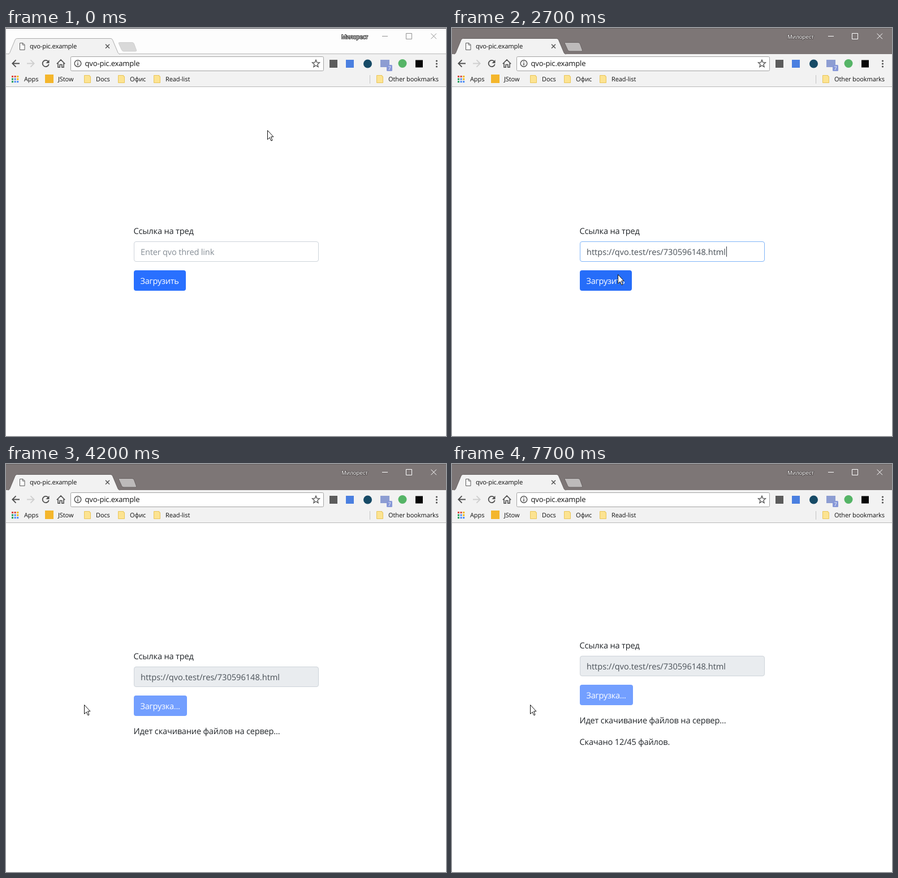
Animation of 778x719 px, one loop 8000 ms. Source, as an HTML page:

```html
<!DOCTYPE html>
<html lang="ru">
<head>
<meta charset="utf-8">
<title>Loader</title>
<style>
  html, body { margin: 0; width: 100%; height: 100%; overflow: hidden; background: #fff; }
  svg { display: block; }
  text {
    font-family: "Open Sans", "Noto Sans", sans-serif;
    text-rendering: geometricPrecision;
    fill: #111;
  }
  .ui { font-size: 11px; letter-spacing: -.1px; }
  .tab { font-size: 11.2px; letter-spacing: -.15px; }
  .url { font-size: 13px; letter-spacing: -.15px; }
  .user { font-size: 10px; letter-spacing: -.2px; fill: #fff; paint-order: stroke; stroke-width: 1.6px; stroke-linejoin: round; }
  .page text { font-size: 14.6px; letter-spacing: -.18px; fill: #212529; }
  .page .hint { fill: #868e96; }
  .page .value { fill: #495057; letter-spacing: 0; }
  .page .action { fill: #fff; letter-spacing: -.3px; }
  .line { fill: none; stroke: #505050; stroke-width: 1.8; }
</style>
</head>
<body>
<svg width="778" height="719" viewBox="0 0 778 719">
  <rect width="778" height="719" fill="#fff"/>

  <!-- title bar -->
  <rect id="bar" width="778" height="45"/>
  <rect id="topLine" width="778" height="1"/>
  <path id="newTab" d="M200.500 25.500H223q2.500 0 3.500 2.500l4 11q.8 2-1.500 2H208q-2.500 0-3.500-2.500l-5-11q-1-2 1-2Z"/>
  <text id="user" class="user" x="593" y="19">Милорест</text>
  <g id="controls" fill="none">
    <path d="M665 14.500H675M707.500 9.500h10v10h-10ZM751.500 9.700l9.500 9.500M761 9.700l-9.500 9.500"/>
  </g>

  <!-- toolbar -->
  <rect y="45" width="778" height="59" fill="#f2f2f2"/>
  <path id="seam" d="M0 45.500H5M201 45.500H778" stroke-width="1"/>
  <path id="tab" fill="#f2f2f2" d="M3.500 46q2.200 0 3.200-2.500L16 21q1-2.500 3.500-2.500H185q2.500 0 3.500 2.500l9.500 22.500q1 2.500 3.500 2.500"/>
  <path d="M0 103.500H778" stroke="#b9b9b9"/>
  <path d="M24.500 26.500h5.500l3 3v9h-8.500ZM29.500 26.500v3.500h3.500" fill="#fff" stroke="#5a5a5a"/>
  <text class="tab" x="42" y="36">qvo-pic.example</text>
  <path class="line" style="stroke-width:1.400" d="M176 28.800l7 7M183 28.800l-7 7"/>

  <path class="line" d="M24 62.500H11.500M17.500 56.300l-6.200 6.200 6.200 6.200"/>
  <path class="line" style="stroke:#cfcfcf" d="M37 62.500H49.500M43.500 56.300l6.200 6.200-6.200 6.200"/>
  <path class="line" d="M74.800 59.300A5.600 5.600 0 1 0 75.700 63.800"/>
  <path d="M76.500 56v6h-6Z" fill="#505050"/>
  <path class="line" style="stroke-width:1.600" d="M89.800 63.200L97 56l7.200 7.200M92 62v7.200h3.200v-4.700h3.600v4.700h3.200V62"/>

  <rect x="114.500" y="50.500" width="447" height="25" rx="2" fill="#fff" stroke="#a3a3a3"/>
  <circle cx="127" cy="62.500" r="5.800" class="line" style="stroke-width:1.400"/>
  <path d="M127 61.500v4.500M127 58.700v1.600" stroke="#505050" stroke-width="1.500"/>
  <text class="url" x="139.500" y="67">qvo-pic.example</text>
  <path id="star" class="line" style="stroke-width:1.300"/>

  <rect x="572" y="56" width="14" height="14" fill="#5c5c5c"/>
  <rect x="601" y="56" width="14" height="14" fill="#4a7fe0"/>
  <circle cx="639.500" cy="63" r="7.500" fill="#164a66"/>
  <rect x="662" y="56" width="16" height="13" fill="#8d9dd2"/>
  <rect x="673" y="65" width="10" height="11" rx="1.500" fill="#8798d8"/>
  <text x="675.500" y="74" style="font-size:9px;fill:#fff">7</text>
  <circle cx="701" cy="62.500" r="7.500" fill="#55b466"/>
  <rect x="724" y="56.500" width="13" height="13" fill="#080808"/>
  <g fill="#505050">
    <circle cx="761.500" cy="58" r="1.600"/><circle cx="761.500" cy="63" r="1.600"/><circle cx="761.500" cy="68" r="1.600"/>
  </g>

  <!-- bookmarks -->
  <g id="marks">
    <rect x="69" y="82" width="15" height="15" fill="#f4b62c"/>
    <path d="M643.500 83V98" stroke="#c4c4c4"/>
  </g>

  <!-- page -->
  <g id="page" class="page">
    <text x="225.500" y="363">Ссылка на тред</text>
    <rect id="field" x="226.500" y="376.500" width="326" height="35" rx="3.500"/>
    <text id="fieldText" x="238" y="400"></text>
    <path id="caret" stroke="#333a40"/>
    <rect id="ring" x="225" y="426" height="38" rx="5" fill="none" stroke="#a9c6ff" stroke-width="2"/>
    <rect id="button" x="226" y="427" height="36" rx="4"/>
    <text id="action" class="action" x="237.500" y="451"></text>
    <text id="status" x="225.500" y="495"></text>
    <text id="count" x="225.500" y="533"></text>
  </g>

  <g id="cursor">
    <path id="arrow" d="M.5 .5V16.500L4.200 13 6.600 18.500H8.600V17L6.600 11.800H11Z" fill="#fff" stroke="#111"/>
    <path id="beam" d="M-3 -6.500H-1L.5 -5.500 2 -6.500H4M.500 -5.500V6.500M-3 7.500H-1L.5 6.500 2 7.500H4" fill="none" stroke="#222" stroke-width="1.200"/>
  </g>
</svg>

<script>
const LOOP = 8000;
const LINK = 'https://qvo.test/res/730596148.html';
const $ = id => document.getElementById(id);
const set = (id, attrs) => {
  for (const k in attrs) $(id).setAttribute(k, attrs[k]);
};
const show = (id, on) => set(id, { visibility: on ? 'visible' : 'hidden' });
const write = (id, text) => {
  if ($(id).textContent !== text) $(id).textContent = text;
};
const add = (parent, tag, attrs, text = '') => {
  const el = document.createElementNS('http://www.w3.org/2000/svg', tag);
  for (const k in attrs) el.setAttribute(k, attrs[k]);
  el.textContent = text;
  $(parent).append(el);
};

function drawChrome() {
  const points = Array.from({ length: 10 }, (_, i) => {
    const r = i % 2 ? 3 : 6.8, a = i * Math.PI / 5;
    return (548 + r * Math.sin(a)).toFixed(2) + ' ' + (63 - r * Math.cos(a)).toFixed(2);
  });
  set('star', { d: 'M' + points.join('L') + 'Z' });

  const [red, yellow, green, blue] = ['#db4437', '#f0b400', '#0f9d58', '#4285f4'];
  [red, red, yellow, green, blue, yellow, green, blue, blue].forEach((fill, i) =>
    add('marks', 'rect', { x: 10 + i % 3 * 4.6, y: 84 + Math.floor(i / 3) * 4.6, width: 3, height: 3, fill }));

  for (const x of [138, 198, 261, 655])
    add('marks', 'path', {
      d: `M${x + .5} 83.500h9.500v2h1.500v11h-11Z`, fill: '#fce391', stroke: '#e9c65c'
    });

  const labels = [[32, 'Apps'], [92, 'JStow'], [159, 'Docs'], [219, 'Офис'], [282, 'Read-list'], [676, 'Other bookmarks']];
  for (const [x, text] of labels) add('marks', 'text', { class: 'ui', x, y: 94 }, text);
}

// Each row: start time, then values held until the next row.
const moves = [
  [0, 462, 180], [100, 458, 192], [200, 441, 231], [300, 415, 289], [400, 388, 345],
  [500, 370, 383], [600, 361, 391], [700, 360, 387],
  [2200, 353, 393], [2300, 341, 401], [2400, 326, 410], [2500, 312, 420],
  [2600, 301, 428], [2700, 293, 434], [2800, 290, 436], [2900, 288, 437],
  [3700, 280, 437], [3800, 256, 435], [3900, 215, 431], [4000, 175, 427],
  [4100, 150, 425], [4200, 138, 424]
];
const borders = [[0, '#ced4da'], [1100, '#bfcbe4'], [1200, '#80b5f8'], [2900, '#ced4da']];
const shifts = [[0, 0], [3400, -19], [4300, -38]];
const messages = [[0, ''], [3400, 'Ссылка правильная.'], [3800, 'Идет скачивание файлов на сервер...']];
const ticks = [4300, 4900, 5400, 5700, 6000, 6400, 6700, 6900, 7100, 7300, 7500, 7700];
const at = (rows, t) => rows.findLast(row => row[0] <= t);

function drawWindow(active) {
  set('bar', { fill: active ? '#7d7676' : '#fdfdfd' });
  set('topLine', { fill: active ? '#686262' : '#3d3d45' });
  set('newTab', { fill: active ? '#bdbaba' : '#d9d9d9', stroke: active ? '#686262' : '#cfcfcf' });
  set('tab', { stroke: active ? '#686262' : '#adadad' });
  set('seam', { stroke: active ? '#7d7676' : '#b9b9b9' });
  set('user', { stroke: active ? '#4d4747' : '#222' });
  set('controls', { stroke: active ? '#fff' : '#929292' });
}

function drawForm(t) {
  const focused = t >= 1100 && t < 2900;
  const filled = t >= 1600;
  const busy = t >= 3300;
  const hover = t >= 2600 && !busy;
  const caretX = filled ? 485.5 : 238.5;
  const width = busy ? 94 : 92;

  set('page', { transform: `translate(0 ${at(shifts, t)[1]})` });
  set('field', { fill: busy ? '#e9ecef' : '#fff', stroke: at(borders, t)[1] });
  write('fieldText', filled ? LINK : 'Enter qvo thred link');
  set('fieldText', { class: filled ? 'value' : 'hint' });
  set('caret', { d: `M${caretX} 385V403` });
  show('caret', focused);

  set('button', { width, fill: busy ? '#739fff' : hover ? '#266df9' : '#2970ff' });
  set('ring', { width: width + 2 });
  show('ring', t >= 3200 && t < 3300);
  write('action', busy ? 'Загрузка...' : 'Загрузить');

  const done = ticks.filter(tick => tick <= t).length;
  write('status', at(messages, t)[1]);
  write('count', done ? `Скачано ${done}/45 файлов.` : '');
}

function drawCursor(t) {
  const [, x, y] = at(moves, t);
  const beam = t < 3000 && y >= 376 && y < 412;
  set('cursor', { transform: `translate(${x} ${y})` });
  show('beam', beam);
  show('arrow', !beam);
}

function render(now) {
  const t = (now - start) % LOOP;
  drawWindow(t >= 1100);
  drawForm(t);
  drawCursor(t);
}

function frame() {
  render(performance.now());
  requestAnimationFrame(frame);
}

drawChrome();
const start = performance.now();
frame();
</script>
</body>
</html>
```
